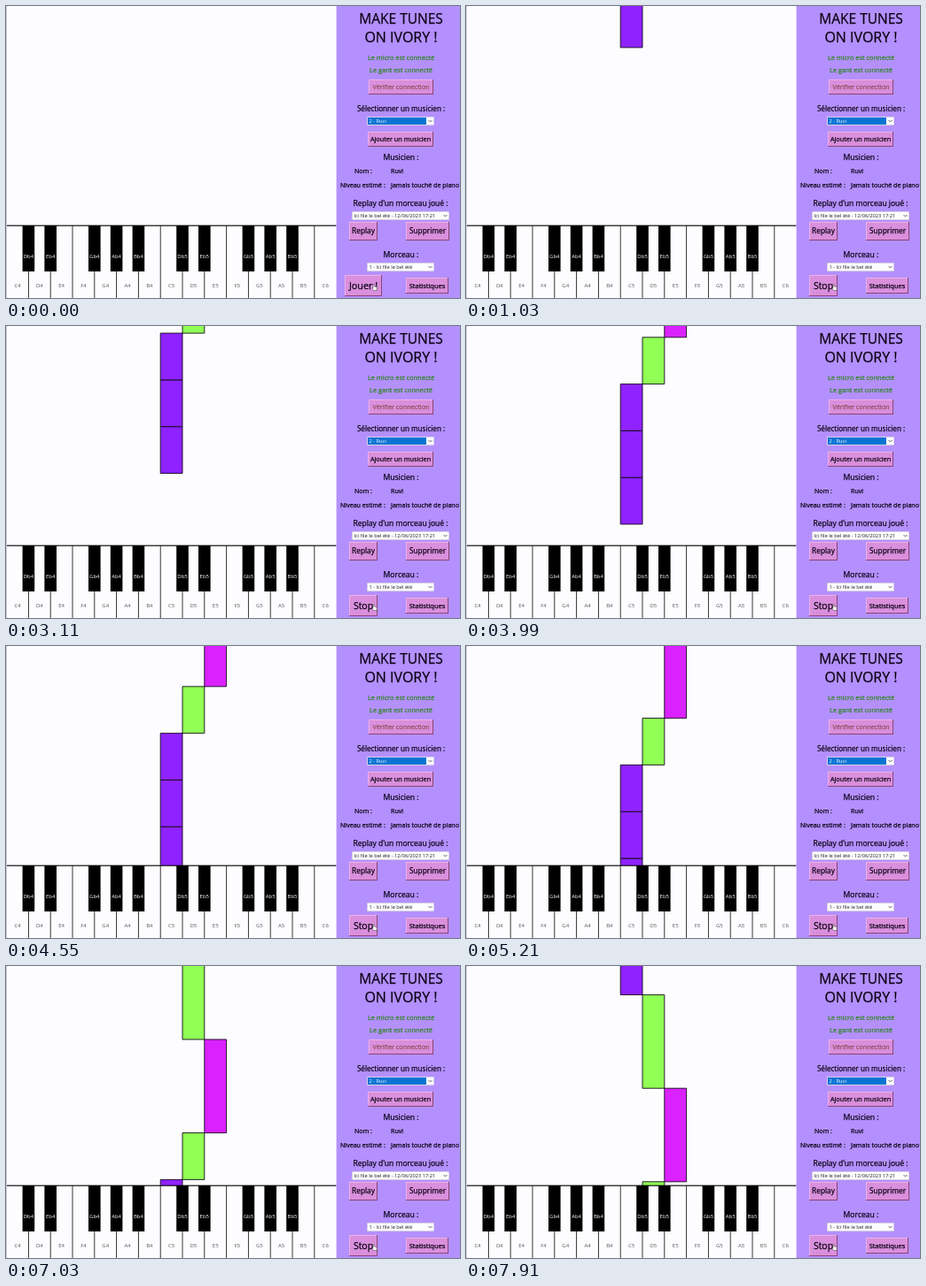
Write an HTML page with a canvas that moves like this. It is 512x330 px and loops after 8000 ms.

```html
<!DOCTYPE html>
<html lang="fr">
<head>
<meta charset="utf-8">
<title>Piano</title>
<style>
  html, body { margin: 0; width: 100%; height: 100%; overflow: hidden; background: #fdfcff; }
  canvas { display: block; width: 512px; height: 330px; }
</style>
</head>
<body>
<canvas id="stage"></canvas>
<script>
const W = 512, H = 330, LOOP = 8000;
const KEY_W = 24.8, KEY_X = 0.6, KEY_TOP = 248, PANEL_X = 372.6, BEAT = 52.8;
const FONT = '"Open Sans", "Noto Sans", sans-serif';
const PURPLE = '#8f22ff', GREEN = '#91ff55', MAGENTA = '#d922ff';
const SONG = 'Ici file le bel été', PLAYER = 'Ruvi';

const canvas = document.getElementById('stage');
const ctx = canvas.getContext('2d');
const scale = window.devicePixelRatio || 1;
canvas.width = W * scale;
canvas.height = H * scale;
ctx.scale(scale, scale);
ctx.lineJoin = 'round';

// White key index, length in beats, colour
const melody = [
  [7, 1, PURPLE], [7, 1, PURPLE], [7, 1, PURPLE], [8, 1, GREEN],
  [9, 2, MAGENTA], [8, 2, GREEN], [7, 1, PURPLE], [9, 1, MAGENTA]
];

// Tick and lower edge of the first note
const fall = [
  [-1, -17], [35, 82.3], [42, 101.5], [53, 131.5], [66, 166],
  [71, 180.5], [86, 223.5], [111, 292.3], [150, 399.3], [170, 454.5]
];

// The picture advances in groups of three: 20, 20, then 100 ms
function tickAt(t) {
  const u = t - 30;
  const group = Math.floor(u / 140);
  const rest = u - group * 140;
  return group * 3 + (rest < 20 ? 0 : rest < 40 ? 1 : 2);
}

function fallAt(tick) {
  let i = 1;
  while (i < fall.length - 1 && tick > fall[i][0]) i++;
  const [k0, y0] = fall[i - 1], [k1, y1] = fall[i];
  return y0 + (y1 - y0) * (tick - k0) / (k1 - k0);
}

const keyEdge = i => KEY_X + i * KEY_W;

function box(x, y, w, h, color) {
  ctx.fillStyle = color;
  ctx.fillRect(x, y, w, h);
}

function text(str, x, y, size, color = '#0c0414', align = 'center') {
  ctx.font = `${size}px ${FONT}`;
  ctx.textAlign = align;
  ctx.textBaseline = 'alphabetic';
  ctx.fillStyle = color;
  ctx.fillText(str, x, y + size * 0.34);
}

// Slightly heavier strokes for the panel lettering
function label(str, x, y, size, color = '#0c0414', align = 'center') {
  text(str, x, y, size, color, align);
  ctx.strokeStyle = color;
  ctx.lineWidth = 0.25;
  ctx.strokeText(str, x, y + size * 0.34);
}

function button(x, y, w, h, caption, size, color) {
  box(x, y, w, h, '#8d4478');
  box(x, y, w - 1, h - 1, '#eeb0e4');
  box(x + 1, y + 1, w - 2, h - 2, '#d98fdc');
  label(caption, x + w / 2, y + h / 2, size, color);
}

function select(x, y, w, value, focused) {
  box(x, y, w, 10, '#b0a2cc');
  box(x + 0.5, y + 0.5, w - 1, 9, '#fdfcff');
  if (focused) box(x + 1, y + 1, w - 10, 8, '#0874d4');
  text(value, x + 2.5, y + 5, 5.7, focused ? '#fff' : '#222', 'left');
  ctx.strokeStyle = '#444';
  ctx.lineWidth = 0.8;
  ctx.beginPath();
  ctx.moveTo(x + w - 6.5, y + 4);
  ctx.lineTo(x + w - 4.5, y + 6);
  ctx.lineTo(x + w - 2.5, y + 4);
  ctx.stroke();
}

function drawNotes(bottom) {
  ctx.save();
  ctx.beginPath();
  ctx.rect(0, 0, PANEL_X, KEY_TOP);
  ctx.clip();
  ctx.lineWidth = 0.9;
  ctx.strokeStyle = '#100818';
  for (const [key, beats, color] of melody) {
    const height = beats * BEAT;
    const top = bottom - height;
    if (top < KEY_TOP && bottom > 0) {
      ctx.fillStyle = color;
      ctx.fillRect(keyEdge(key), top + 0.5, KEY_W, height);
      ctx.strokeRect(keyEdge(key), top + 0.5, KEY_W, height);
    }
    bottom = top;
  }
  ctx.restore();
}

function drawKeys() {
  box(0, KEY_TOP, PANEL_X, H - KEY_TOP, '#fdfcff');
  for (let i = 0; i < 15; i++) {
    const name = 'CDEFGAB'[i % 7] + (4 + Math.floor(i / 7));
    if (i) box(keyEdge(i) - 0.45, KEY_TOP, 0.9, H - KEY_TOP, '#25221f');
    text(name, keyEdge(i + 0.5), 316, 6, '#555');
  }
  box(0, KEY_TOP - 0.4, PANEL_X, 1.2, '#111');
  for (let i = 1; i < 15; i++) {
    const letter = 'CDEFGAB'[i % 7];
    if (letter === 'C' || letter === 'F') continue;
    box(keyEdge(i) - 6.8, KEY_TOP, 13.6, 52, '#000');
    text(letter + 'b' + (4 + Math.floor(i / 7)), keyEdge(i), 282.5, 6, '#fff');
  }
  box(0, 0, 1, H, '#c9c6cf');
}

function drawPointer() {
  ctx.fillStyle = '#fff';
  ctx.strokeStyle = '#333';
  ctx.lineWidth = 0.5;
  ctx.beginPath();
  ctx.moveTo(414, 314.5);
  ctx.lineTo(415, 314.5);
  ctx.lineTo(415.4, 317);
  ctx.lineTo(418.5, 317.7);
  ctx.lineTo(418, 321.5);
  ctx.lineTo(414.7, 321.5);
  ctx.lineTo(412.8, 318.7);
  ctx.lineTo(414, 318.7);
  ctx.closePath();
  ctx.fill();
  ctx.stroke();
}

function drawPanel(playing) {
  const mid = 445.5;
  const connected = '#2f8522';
  box(PANEL_X, 0, W - PANEL_X, H, '#b490ff');
  label('MAKE TUNES', mid, 15, 15.5);
  label('ON IVORY !', mid, 36, 16);
  label('Le micro est connecté', mid, 58, 7.4, connected);
  label('Le gant est connecté', mid, 72.5, 7.4, connected);
  button(409, 83, 73, 17, 'Vérifier connection', 7.3, '#96505f');

  label('Sélectionner un musicien :', mid, 116, 8.1);
  select(407, 125, 76, '2 - ' + PLAYER, true);
  button(408, 142, 74, 17, 'Ajouter un musicien', 7.3);

  label('Musicien :', mid, 171, 8.6);
  label('Nom :', 393, 186.5, 7.1, undefined, 'left');
  label(PLAYER, 434, 186.5, 7.1, undefined, 'left');
  label('Niveau estimé :', 377, 203, 7.1, undefined, 'left');
  label('Jamais touché de piano', 434, 203, 7.1, undefined, 'left');

  label("Replay d'un morceau joué :", 445, 223, 8.5);
  select(390, 232, 110, SONG + ' - 12/06/2023 17:21');
  button(387, 244, 32, 21, 'Replay', 8.3);
  button(451, 244, 49, 21, 'Supprimer', 8.3);

  label('Morceau :', mid, 281, 8.6);
  select(407, 290, 76, '1 - ' + SONG);
  if (playing) button(387, 304, 32, 24, 'Stop', 10.5);
  else button(382, 304, 42, 24, 'Jouer !', 10.8);
  button(451, 307, 48, 18, 'Statistiques', 7.5);
  drawPointer();
}

function draw(t) {
  box(0, 0, W, H, '#fdfcff');
  drawNotes(fallAt(tickAt(t)));
  drawKeys();
  drawPanel(t >= 20);
}

const start = performance.now();
function loop() {
  draw((performance.now() - start) % LOOP);
  requestAnimationFrame(loop);
}
loop();
</script>
</body>
</html>
```
